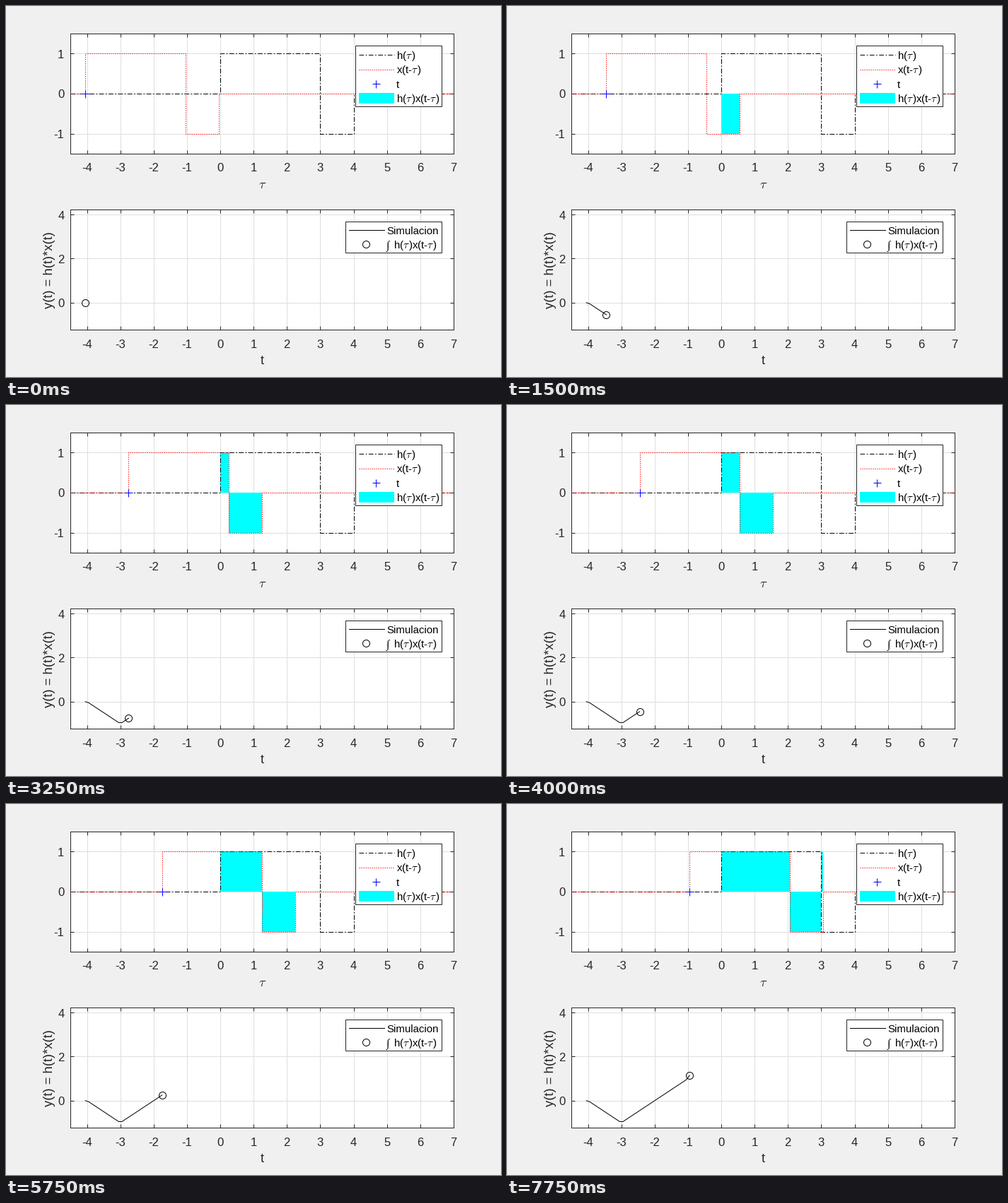
These frames come from a looping animation (700 by 525 pixels, 8000 ms). A matplotlib script:

```python
import numpy as np
import matplotlib.pyplot as plt
from matplotlib.animation import FuncAnimation
from matplotlib.patches import Rectangle

W, H = 700, 525
PX = 0.72  # points per pixel at 100 dpi
INK = "#262626"
DASH_DOT = (0, (6.7, 2.5, 1.7, 2.5))
DOTS = (0, (1.3, 1.7))
TAU = r"$\tau\hspace{0.1}$"
FRAMES = 32

plt.rcParams["font.family"] = "Liberation Sans"
plt.rcParams["mathtext.fontset"] = "cm"

fig = plt.figure(figsize=(W / 100, H / 100), dpi=100, facecolor="#f0f0f0")


def make_axes(top, ylim, yticks):
    ax = fig.add_axes([91 / W, (H - top - 170) / H, 542 / W, 170 / H])
    ax.set(xlim=(-4.5, 7), ylim=ylim, xticks=range(-4, 8), yticks=yticks)
    ax.set_axisbelow(True)
    ax.grid(color="#dedede", linewidth=PX)
    ax.tick_params(direction="in", top=True, right=True, length=5.4 * PX,
                   width=PX, color=INK, labelbottom=False, labelleft=False)
    for spine in ax.spines.values():
        spine.set(linewidth=PX, color=INK)
    return ax


signals = make_axes(39, (-1.5, 1.5), [-1, 0, 1])
result = make_axes(288, (-1.225, 4.225), [0, 2, 4])

# Overlay in pixel coordinates for labels and legends
page = fig.add_axes([0, 0, 1, 1], zorder=5)
page.set(xlim=(0, W), ylim=(H, 0))
page.axis("off")


def write(x, y, text, size=15, color="black", ha="left", **kw):
    page.text(x, y, text, fontsize=size * PX, color=color, ha=ha,
              va="baseline", **kw)


def stroke(ax, xs, ys, color="black", style="-", **kw):
    return ax.plot(xs, ys, color=color, linestyle=style, linewidth=PX, **kw)[0]


def mark(ax, x, y, shape, color="black"):
    size = 11 if shape == "+" else 10
    return ax.plot([x], [y], shape, color=color, markersize=size * PX,
                   markerfacecolor="none", markeredgewidth=PX, zorder=4)[0]


def legend_box(x, y, w, h):
    page.add_patch(Rectangle((x, y), w, h, facecolor="white",
                             edgecolor=INK, linewidth=PX))


def tick_labels():
    for v in range(-4, 8):
        x = 90.8 + (v + 4.5) * 542 / 11.5
        for y in (234.5, 483.5):
            write(x, y, str(v), 16.67, INK, "center")
    for v in (-1, 0, 1):
        write(82.5, 130.5 - v * 56.67, str(v), 16.67, INK, "right")
    for v in (0, 2, 4):
        write(82.5, 426.5 - v * 31.2, str(v), 16.67, INK, "right")


tick_labels()
write(362.5, 258, r"$\tau$", 18.33, INK, "center")
write(362, 507, "t", 18.33, INK, "center")
write(65.5, 373.5, "y(t) = h(t)*x(t)", 18.33, INK, "center",
      rotation=90, rotation_mode="anchor")

legend_box(494, 56, 122, 86)
stroke(page, [499, 549], [69, 69], style=DASH_DOT)
stroke(page, [499, 549], [90, 90], "red", DOTS)
mark(page, 523, 110, "+", "blue")
page.add_patch(Rectangle((499, 123), 50, 15, color="cyan", linewidth=0))
write(552, 75, f"h({TAU})")
write(552, 95.5, f"x(t-{TAU})")
write(552, 116, "t")
write(552, 136, f"h({TAU})x(t-{TAU})")

legend_box(480, 305, 136, 44)
stroke(page, [485, 535], [317, 317])
mark(page, 509, 337, "o")
write(538, 323, "Simulacion")
write(538, 344, "\u222b", 16, family="Liberation Serif")
write(548.5, 343.5, f"h({TAU})x(t-{TAU})")

# Moving parts
areas = [signals.add_patch(Rectangle((0, 0), 0, 0, color="cyan",
                                     linewidth=0, zorder=1.5))
         for _ in range(3)]
stroke(signals, [-4.5, 0, 0, 3, 3, 4, 4, 7], [0, 0, 1, 1, -1, -1, 0, 0],
       style=DASH_DOT)
flipped = stroke(signals, [], [], "red", DOTS)
cross = mark(signals, 0, 0, "+", "blue")
curve = stroke(result, [], [])
ring = mark(result, 0, 0, "o")

times = -4.05 + 0.1 * np.arange(FRAMES)


def overlaps(t):
    """Start, end and sign of each stretch where the product is not zero."""
    mid = np.clip(t + 3, 0, 3)
    end = np.clip(t + 4, 0, 3)
    return [(0, mid, 1), (mid, end, -1), (3, np.clip(t + 4, 3, 4), 1)]


output = sum(sign * (b - a) for a, b, sign in overlaps(times))


def update(i):
    t = times[i]
    for area, (a, b, sign) in zip(areas, overlaps(t)):
        area.set_bounds(a, 0, b - a, sign)
        area.set_visible(b - a > 1e-6)
    flipped.set_data([-4.5, t, t, t + 3, t + 3, t + 4, t + 4, 7],
                     [0, 0, 1, 1, -1, -1, 0, 0])
    cross.set_data([t], [0])
    curve.set_data(times[:i + 1], output[:i + 1])
    ring.set_data([t], [output[i]])
    return [*areas, flipped, cross, curve, ring]


anim = FuncAnimation(fig, update, frames=FRAMES, interval=250,
                     repeat=True, repeat_delay=0, blit=False)
plt.show()
```
